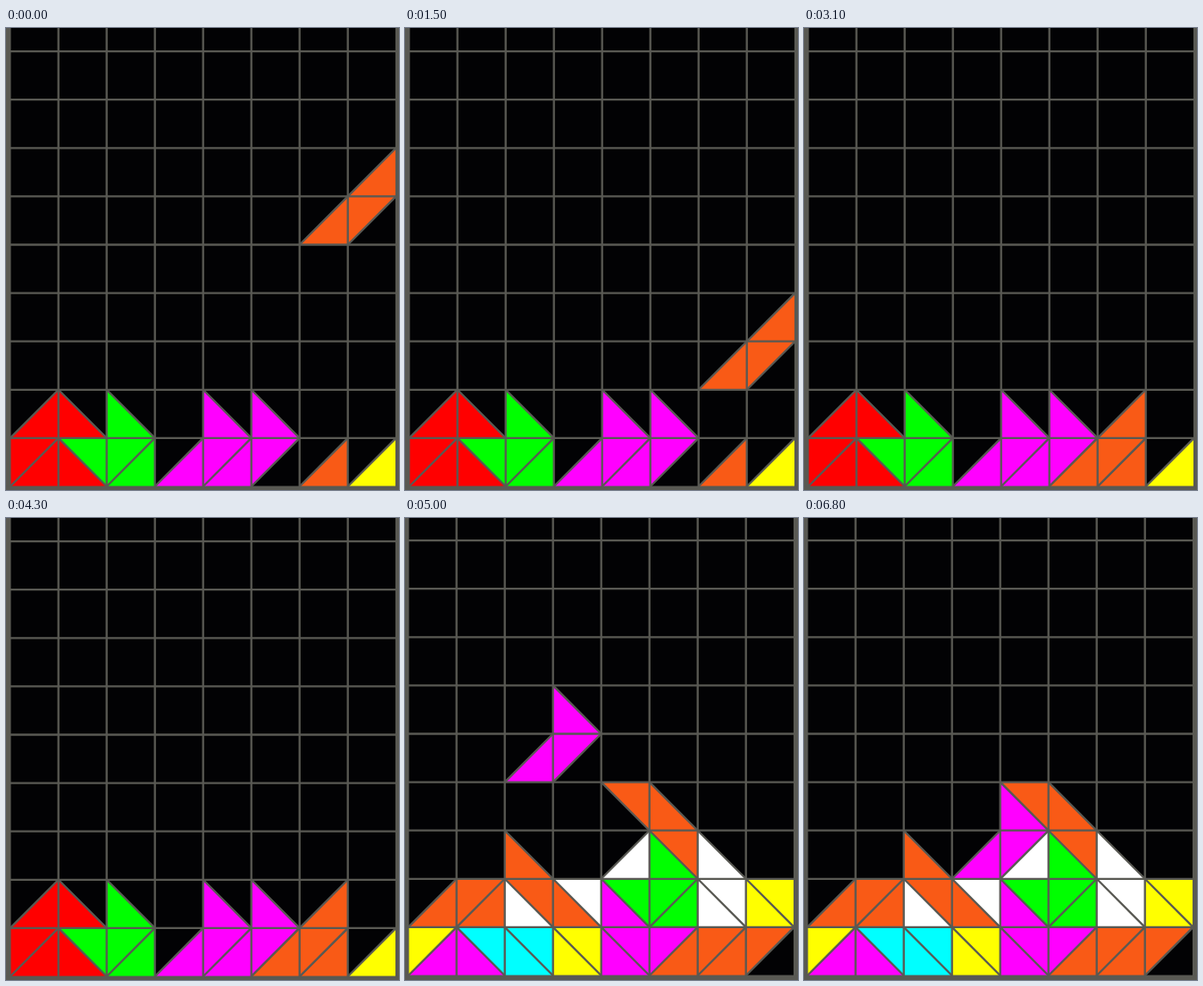
Write an HTML page with a canvas that moves like this. It is 440 px wide and 517 px high and loops after 7600 ms.

```html
<!DOCTYPE html>
<html lang="en">
<head>
<meta charset="utf-8">
<title>Falling triangles</title>
<style>
  html, body { margin: 0; width: 100%; height: 100%; overflow: hidden; background: #020204; }
  canvas { display: block; width: 440px; height: 517px; }
</style>
</head>
<body>
<canvas id="stage" width="440" height="517"></canvas>
<script>
const ctx = document.getElementById('stage').getContext('2d');
const LOOP = 7600, W = 440, H = 517, COLS = 8, ROWS = 10;
const CELL_W = 54, CELL_H = 54.1, LEFT = 4.7, TOP = 26.1 - CELL_H;
const LINE = '#595953', BACK = '#020204';
const COLORS = {
  R: '#ff0000', G: '#00ff00', M: '#ff00ff', O: '#f95a16',
  Y: '#ffff00', C: '#00ffff', W: '#ffffff'
};

// A cell is its diagonal, the colour above it and the colour below it.
// Steps are [time, columns, rows]: the offset of the piece from that time on.
const scenes = [
  {
    start: 0, shift: 0,
    board: {
      8: '/.R \\.R \\.G ... \\.M \\.M ... ...',
      9: '/RR \\GR /GG /.M /MM /M. /.O /.Y'
    },
    piece: [[7, 3, '/.O'], [6, 4, '/.O'], [7, 4, '/O.']],
    steps: [[0, 0, 0], [100, 0, 1], [700, 0, 2], [1500, 0, 3], [2200, 0, 4], [3100, -1, 5]]
  },
  {
    start: 4700, shift: -1,
    board: {
      6: '... ... ... ... \\O. \\.O ... ...',
      7: '... ... \\.O ... /.W \\OG \\.W ...',
      8: '/.O /OO \\OW \\WO \\GM /GG \\WW \\YY',
      9: '/YM \\CM \\CC \\YY \\MM /MO /OO /O.'
    },
    piece: [[3, 2, '\\.M'], [2, 3, '/.M'], [3, 3, '/M.']],
    steps: [[4700, 0, 0], [4800, 0, 1], [5000, 0, 2], [5300, 0, 3], [5800, 1, 4]]
  }
];

const colX = c => LEFT + c * CELL_W;
const rowY = r => TOP + r * CELL_H;
const latest = (list, t, key) => list.filter(item => key(item) <= t).pop();

function triangle(points, color) {
  if (color === '.') return;
  ctx.fillStyle = COLORS[color];
  ctx.beginPath();
  points.forEach(p => ctx.lineTo(...p));
  ctx.fill();
}

function segment(x1, y1, x2, y2) {
  ctx.beginPath();
  ctx.moveTo(x1, y1);
  ctx.lineTo(x2, y2);
  ctx.stroke();
}

function drawCell(col, row, [diagonal, upper, lower]) {
  if (diagonal === '.') return;
  const x1 = colX(col), x2 = colX(col + 1), y1 = rowY(row), y2 = rowY(row + 1);
  const rising = diagonal === '/';
  const a = rising ? [x1, y2] : [x1, y1];
  const b = rising ? [x2, y1] : [x2, y2];
  triangle([a, b, [rising ? x1 : x2, y1]], upper);
  triangle([a, b, [rising ? x2 : x1, y2]], lower);
  segment(...a, ...b);
}

function drawGrid() {
  for (let c = 1; c < COLS; c++) segment(colX(c), 0, colX(c), H);
  for (let r = 1; r < ROWS; r++) segment(0, rowY(r), W, rowY(r));
}

function drawFrame(shift) {
  const right = 436 + shift, bottom = 512.5 + shift;
  ctx.fillStyle = LINE;
  ctx.fillRect(0, 0, 5.5 + shift, H);
  ctx.fillRect(right, 0, W - right, H);
  ctx.fillRect(0, bottom, W, H - bottom);
}

function render(t) {
  const { board, piece, steps, shift } = latest(scenes, t, s => s.start);
  const [, dx, dy] = latest(steps, t, s => s[0]);
  ctx.fillStyle = BACK;
  ctx.fillRect(0, 0, W, H);
  ctx.strokeStyle = LINE;
  ctx.lineWidth = 2.3;
  ctx.save();
  ctx.translate(shift, shift);
  for (const row in board) {
    board[row].split(' ').forEach((cell, col) => drawCell(col, +row, cell));
  }
  piece.forEach(([col, row, cell]) => drawCell(col + dx, row + dy, cell));
  drawGrid();
  ctx.restore();
  drawFrame(shift);
}

const origin = performance.now();
function tick() {
  render((performance.now() - origin) % LOOP);
  requestAnimationFrame(tick);
}
tick();
</script>
</body>
</html>
```
